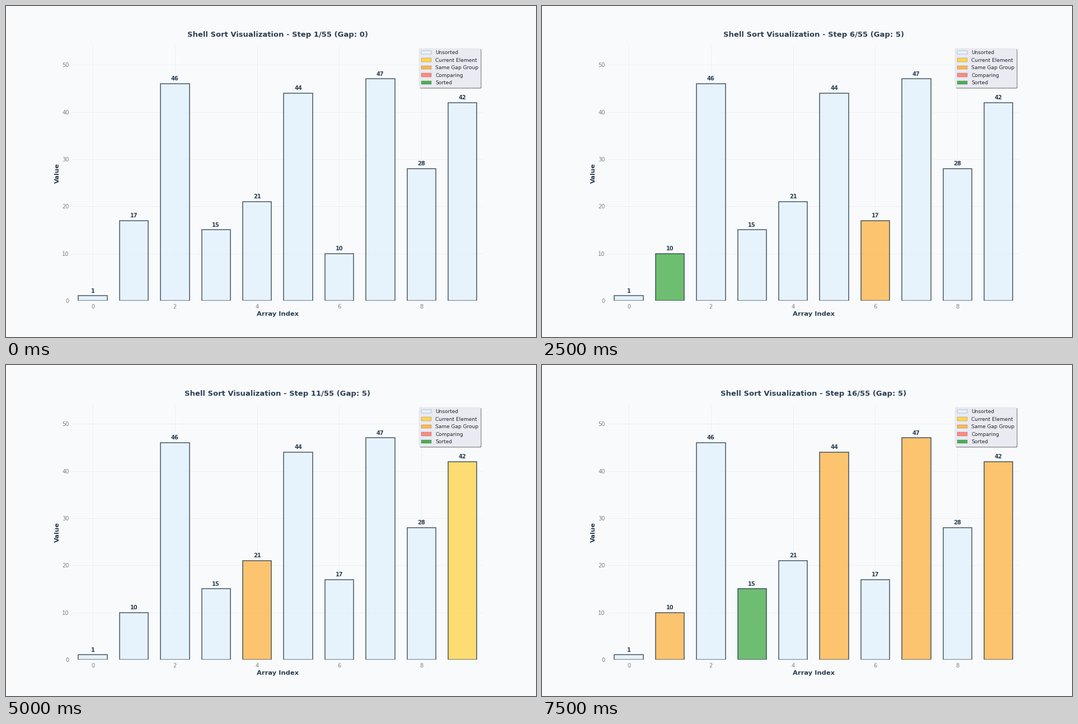
These frames come from a looping animation (947x592 px, 8000 ms). A matplotlib script:

```python
import matplotlib.pyplot as plt
from matplotlib.animation import FuncAnimation
from matplotlib.patches import Patch

VALUES = [1, 17, 46, 15, 21, 44, 10, 47, 28, 42]
N = len(VALUES)
FRAMES, TOTAL = 16, 55
DPI = 947 / 16
BG, INK = "#F8FAFC", "#2C3E50"
COLORS = {
    "Unsorted": "#E3F2FD",
    "Current Element": "#FFD54F",
    "Same Gap Group": "#FFB74D",
    "Comparing": "#FF8A80",
    "Sorted": "#4CAF50",
}

plt.rcParams.update({
    "font.family": "DejaVu Sans",
    "text.color": "#262626",
    "patch.linewidth": 0.3,
    "axes.axisbelow": True,
    "legend.facecolor": "#EAEAF2",
})


def shell_steps(values):
    """Yield (values, state of each bar) for every stage of the sort."""
    a = list(values)

    def snap(group=(), **marks):
        state = ["Unsorted"] * N
        for k in group:
            state[k] = "Same Gap Group"
        for name, bars in marks.items():
            for k in bars:
                state[k] = name.replace("_", " ")
        return list(a), state

    yield snap()
    gap = N // 2
    while gap:
        for i in range(gap, N):
            group = range(i % gap, N, gap)
            if gap == N // 2:
                group = (i - gap, i)
            yield snap(group, Current_Element=[i])
            item, j = a[i], i
            while j >= gap and a[j - gap] > item:
                yield snap(group, Comparing=[j, j - gap])
                a[j] = a[j - gap]
                j -= gap
            a[j] = item
            yield snap(group, Sorted=[j])
        gap //= 2


# The sweep with gap 2 starts at index 2, right after the gap 5 pairs.
steps = [step for _, step in zip(range(FRAMES), shell_steps(VALUES))]

fig = plt.figure(figsize=(16, 592.01 / DPI), dpi=DPI, facecolor=BG)
ax = fig.add_axes([0.125, 0.11, 0.775, 0.77], facecolor=BG)
ax.set_xlim(-0.5, N - 0.5)
ax.set_ylim(0, max(VALUES) * 1.15)
ax.set_xticks(range(0, N, 2))
ax.set_yticks(range(0, 51, 10))
ax.tick_params(length=0, pad=7, labelsize=12, labelcolor="#808080")
ax.grid(True, color="#CCCCCC", alpha=0.3, linewidth=0.8)
for spine in ax.spines.values():
    spine.set_visible(False)

label_style = dict(fontsize=14, fontweight="bold", color=INK)
ax.set_xlabel("Array Index", **label_style)
ax.set_ylabel("Value", **label_style)
title = ax.set_title("", fontsize=16, fontweight="bold", color=INK, pad=20)

bars = ax.bar(range(N), VALUES, width=0.7, edgecolor=INK, linewidth=2, alpha=0.8)
labels = [ax.text(k, 0, "", ha="center", va="baseline", fontsize=12,
                  fontweight="bold", color=INK) for k in range(N)]
ax.legend(handles=[Patch(facecolor=c, edgecolor=INK, label=name)
                   for name, c in COLORS.items()],
          loc="upper right", fontsize=11, frameon=True, fancybox=True, shadow=True)


def update(n):
    values, states = steps[n]
    for bar, label, v, state in zip(bars, labels, values, states):
        bar.set_height(v)
        bar.set_facecolor(COLORS[state])
        label.set_text(str(v))
        label.set_y(v + 0.69)
    gap = N // 2 if n else 0
    title.set_text(f"Shell Sort Visualization - Step {n + 1}/{TOTAL} (Gap: {gap})")
    return [*bars, *labels, title]


anim = FuncAnimation(fig, update, frames=FRAMES, interval=500, repeat=True,
                     repeat_delay=0, blit=False)
plt.show()
```
